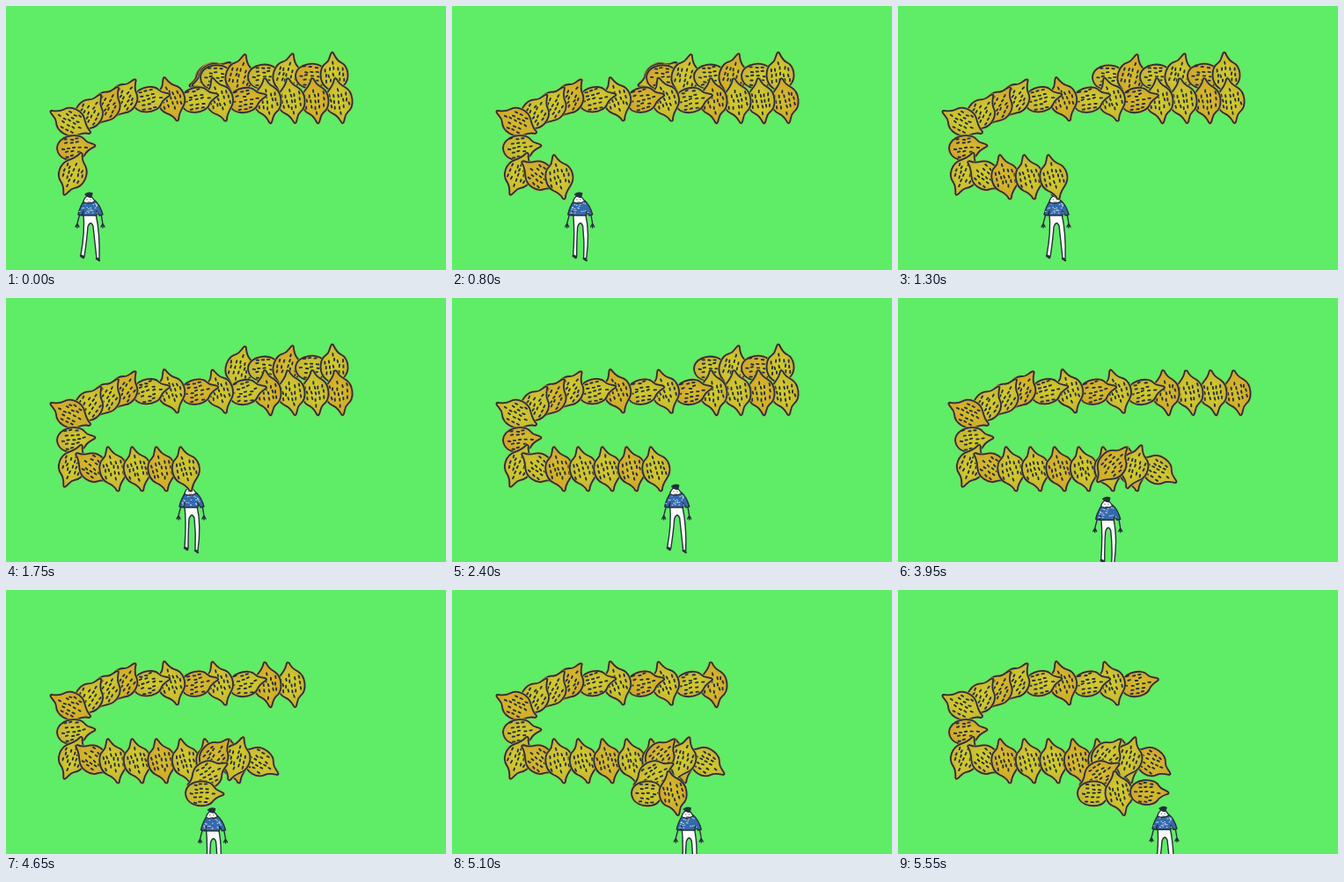
An HTML page that plays this animation: 500 by 300 pixels, repeating every 5.6 s.

```html
<!DOCTYPE html>
<html lang="en">
<head>
<meta charset="utf-8">
<style>
  html, body { margin: 0; width: 100%; height: 100%; overflow: hidden; background: #5fec67; }
  svg { display: block; width: 500px; height: 300px; }
</style>
</head>
<body>
<svg viewBox="0 0 500 300" stroke-linecap="round" stroke-linejoin="round">
  <defs>
    <radialGradient id="cool">
      <stop offset=".4" stop-color="#d0c72d"/><stop offset="1" stop-color="#c6b136"/>
    </radialGradient>
    <radialGradient id="warm">
      <stop offset=".3" stop-color="#d4b92b"/><stop offset="1" stop-color="#d1a32b"/>
    </radialGradient>
  </defs>
  <rect width="500" height="300" fill="#5fec67"/>
  <g id="scene"><g id="man"></g><g id="lemons"></g></g>
</svg>
<script>
const LOOP = 5600, FRAME = 50, STEP = 400, LEAD = 330, LENGTH = 24;
const INK = '#25303a';
const [scene, man, lemons] = ['scene', 'man', 'lemons'].map(id => document.getElementById(id));

// Corners of the route; leans are for even and odd lemons from here on.
const route = [
  { at: 0, x: 232, y: 82, leans: [-40, 160] },
  { at: 4, x: 238, y: 81, leans: [0, -75] },
  { at: 9, x: 373, y: 79, leans: [0, -95] },
  { at: 10, x: 378, y: 107, leans: [80, 82] },
  { at: 14, x: 270, y: 107, leans: [-12, -108] },
  { at: 19, x: 133, y: 106, leans: [-58, -58] },
  { at: 22, x: 74, y: 132, leans: [-152, -5] },
  { at: 24, x: 76, y: 190, leans: [112, 38] },
  { at: 26, x: 122, y: 195, leans: [-104, -104] },
  { at: 32, x: 287, y: 195, leans: [33, -72] },
  { at: 34, x: 236, y: 190, leans: [-50, -30] },
  { at: 36, x: 221, y: 231, leans: [2, 77] },
  { at: 39, x: 311, y: 229 }
];

function place(s) {
  const next = route.findIndex(p => p.at > s);
  const a = route[next - 1], b = route[next], u = (s - a.at) / (b.at - a.at);
  return { x: a.x + (b.x - a.x) * u, y: a.y + (b.y - a.y) * u, leans: a.leans };
}

const noise = n => { const s = Math.sin(n * 12.9898) * 43758.5453; return s - Math.floor(s); };

const tipAbove = 'M26-1C22-4 18-3 15-8C10-17';
const tipBelow = '9 17 14 9C17 4 21 3 26 1Q27 0 26-1Z';
const pointed = `${tipAbove} -6-18-13-10C-16-6-19-3-24-2Q-26 0-24 1C-18 3-16 6-12 10C-5 18 ${tipBelow}`;
const blunt = `${tipAbove} -16-16-17 0C-16 17 ${tipBelow}`;

function dashes(seed) {
  let d = '';
  for (let row = -2; row <= 2; row++) {
    const reach = 13 - Math.abs(row) * 2.2;
    for (let x = -reach + (row & 1) * 3; x < reach; x += 6.4) {
      const n = noise(seed + row * 7 + x);
      d += `M${(x + n * 2).toFixed(1)} ${(row * 5 + n * 2 - 1).toFixed(1)}l2.4 ${(n - .5).toFixed(1)}`;
    }
  }
  return d;
}

function lemon(i, phase) {
  const { x, y, leans } = place(i);
  const lean = leans[i % 2];
  const shape = Math.abs(Math.sin(lean * Math.PI / 180)) < .3 ? blunt : pointed;
  const fill = i % 3 === (phase ? 1 : 2) ? 'warm' : 'cool';
  return `<g transform="translate(${x.toFixed(1)} ${y.toFixed(1)}) rotate(${lean})">
    <path d="${shape}" fill="none" stroke="#c9a63a" stroke-width="3.2" opacity=".7"/>
    <path d="${shape}" fill="url(#${fill})" stroke="${INK}" stroke-width="1.8"/>
    <path d="${dashes(i * 31 + phase * 5)}" stroke="${INK}" stroke-width="1.9"/></g>`;
}

function drawMan(phase) {
  const swing = 2 * Math.cos(phase * Math.PI * 2 / 3);
  const l = -8 - swing, r = 6 + swing;
  let specks = '';
  for (let i = 0; i < 26; i++) {
    const y = 223 + noise(i + 90) * 13;
    const x = (noise(i + phase * 40) - .5) * (y - 210);
    specks += `M${x.toFixed(1)} ${y.toFixed(1)}h.8`;
  }
  return `<g stroke="${INK}" stroke-width="1.4" fill="#fff">
    <path d="M-7 236Q-5 256 ${l} 283L${l + 4} 285Q-3 265-2 251Q1 243 4 250Q6 268 ${r} 287L${r + 3} 287Q12 258 7 236Z"/>
    <path d="M${l} 284l3 2M${r} 287l3 2" stroke-width="2.4"/>
    <path d="M-11 236L-14 247l-2 4M-14 247v5M-14 247l2 4M13 236L15 247l2 4M15 247v5M15 247l-2 4"/>
    <path d="M-6 221Q-11 228-13 237L-9 238L-7 233L-8 238H8L8 233L11 238L15 237Q12 226 6 221Z" fill="#3569ad"/>
    <path d="${specks}" stroke="#c3dcf0" stroke-width="1"/>
    <path d="M-3 216Q-7 219-7 223Q0 226 6 222Q4 218 1 216Z"/>
    <path d="M-3 220h.5M1 220h.5M-2 223h3" stroke-width=".8"/>
    <path d="M-5 214Q-1 211 3 213L2 217Q0 218-3 216Z" fill="${INK}"/></g>`;
}

let drawn = '';
function render(time) {
  const t = Math.floor((time % LOOP) / FRAME) * FRAME;
  const s = LENGTH + (t + LEAD) / STEP;
  const head = Math.floor(s);
  const phase = Math.floor(t / 200) % 3;
  const key = head + ':' + phase;
  if (key !== drawn) {
    drawn = key;
    let row = '';
    for (let i = head - LENGTH; i <= head; i++) row += lemon(i, phase);
    lemons.innerHTML = row;
    man.innerHTML = drawMan(phase);
  }
  const shift = t >= 2900 && t < 4250 ? 7 : 0;
  const { x, y } = place(s);
  const drop = Math.max(0, y - 195) + shift * .7;
  scene.setAttribute('transform', `translate(${shift} 0)`);
  man.setAttribute('transform', `translate(${x.toFixed(2)} ${drop.toFixed(2)})`);
}

const start = performance.now();
function tick() {
  render(performance.now() - start);
  requestAnimationFrame(tick);
}
tick();
</script>
</body>
</html>
```
